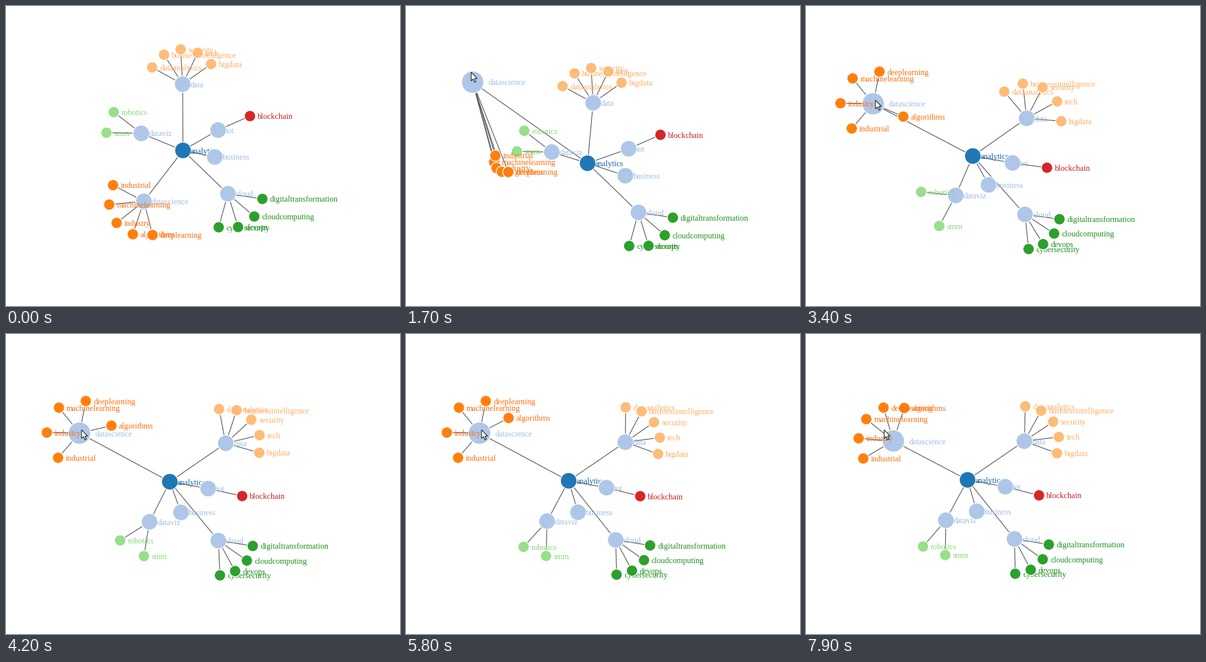
A matplotlib script that plays this animation: 600x457 px, repeating every 8 s.

```python
import numpy as np
import matplotlib.pyplot as plt
from matplotlib.animation import FuncAnimation
from matplotlib.collections import LineCollection
from matplotlib.colors import to_rgb
from matplotlib.patches import Circle, Polygon

W, H, DPI = 600, 457, 100
FRAMES, STEP = 80, 100
# The hub is grabbed and pulled away, the graph swings round and settles.
GRAB, PULLED, SWUNG, TURNED, RELEASE, END = 1250, 1700, 2400, 3400, 7300, 7900
SETTLE = 670
DRIFT, ROOT_DRIFT = np.array([16, 28.5]), np.array([7, 19.5])
RECOIL = np.array([-1.5, -1.3])
TRAIL, SQUEEZE = np.array([50, 120]), 0.65
LINK = 53
ROOT, HELD = "analytics", "datascience"

# Hub centres at rest, swung, turned and settled.
HUBS = {
    ROOT: [(269.5, 220), (267, 234.5), (254, 228.5), (247.5, 223.5)],
    "data": [(269, 119), (319, 178.5), (336, 171), (334, 164.5)],
    "dataviz": [(206, 194), (230.5, 281.5), (228, 288.5), (214.5, 285)],
    "iot": [(323, 189), (335, 247.5), (314.5, 239), (305, 234)],
    "business": [(318, 230), (299, 275.5), (278, 272.5), (261.5, 271.5)],
    "cloud": [(338, 286), (352, 336), (333.5, 317.5), (319, 313.5)],
}
# Time and place of the dragged hub.
DRAG = np.array([(GRAB, 210, 297.5), (PULLED, 101.5, 116), (2000, 95, 99),
                 (SWUNG, 97, 105), (2900, 102.5, 148.5), (3500, 103, 148.5),
                 (4000, 112, 151)])


def fan(order, centre, spread):
    """Leaf angles spread evenly around a centre, in degrees."""
    mid = (len(order) - 1) / 2
    return {n: centre + (i - mid) * spread for i, n in enumerate(order)}


def fans(names, *shapes):
    order = names.split()
    stages = [fan(order, *shape) for shape in shapes]
    return order, stages + stages[-1:]


def held_fans():
    at_rest = "deeplearning algorithms industry machinelearning industrial".split()
    swung = "deeplearning algorithms industrial industry machinelearning".split()
    ring = swung[2:][:] + swung[:2]
    opened = fan(ring, 231, 50)
    stages = [fan(at_rest, 141.6, 33), fan(swung, 90, 36),
              opened | {"algorithms": 23}, opened, fan(ring, 219, 34.6)]
    return swung[::-1], stages


FAMILIES = {
    "data": ("#ffbb78", *fans(
        "dataanalytics businessintelligence security tech bigdata",
        (266.7, 29), (273.7, 34.5), (297.4, 33.7), (326, 27.2))),
    "dataviz": ("#98df8a", *fans(
        "smm robotics", (199.4, 36.7), (198, 64.6), (152, 67.5), (111, 40))),
    HELD: ("#ff7f0e", *held_fans()),
    "iot": ("#d62728", *fans(
        "blockchain", (-23.7, 0), (-0.5, 0), (8, 0), (14.3, 0))),
    "cloud": ("#2ca02c", *fans(
        "cybersecurity devops cloudcomputing digitaltransformation",
        (57, -32.3), (50, -25.5), (46, -25.4), (49, -26.5))),
}


def ramp(t, a, b):
    return np.clip((t - a) / (b - a), 0, 1)


def smooth(u):
    return u * u * (3 - 2 * u)


def hermite(a, b, u, m0=0, m1=0):
    return a + (b - a) * smooth(u) + m0 * u * (1 - u)**2 - m1 * u * u * (1 - u)


def relax(keys, t, drift=0):
    """Drift off, swing, turn, settle exponentially, then give way on release."""
    rest, swung, turned, settled, freed = keys
    if t < PULLED:
        return rest + drift * ramp(t, GRAB, PULLED)**2
    if t < SWUNG:
        speed = 2 * drift / (PULLED - GRAB) * (SWUNG - PULLED)
        return hermite(rest + drift, swung, ramp(t, PULLED, SWUNG), speed)
    if t < TURNED:
        speed = (settled - turned) / SETTLE * (TURNED - SWUNG)
        return hermite(swung, turned, ramp(t, SWUNG, TURNED), 0, speed)
    near = settled + (turned - settled) * np.exp((TURNED - t) / SETTLE)
    return near + (freed - settled) * ramp(t, RELEASE, END)**2


def drag(t):
    """Smooth curve through the drag points."""
    times, spots = DRAG[:, 0], DRAG[:, 1:]
    speed = np.gradient(spots, times, axis=0)
    speed[[0, -1]] = 0
    i = np.clip(np.searchsorted(times, t, side="right") - 1, 0, len(times) - 2)
    span = times[i + 1] - times[i]
    return hermite(spots[i], spots[i + 1], ramp(t, times[i], times[i + 1]),
                   speed[i] * span, speed[i + 1] * span)


def cursor_at(t):
    free = ramp(t, RELEASE, END)**2
    spot = drag(t + 70) + (3 + 4 * free, -5)
    enter = smooth(ramp(t, 150, 850))
    return spot * enter + np.array([228, -20]) * (1 - enter)


def px(n):
    return n * 72 / DPI


fig = plt.figure(figsize=(W / DPI, H / DPI), dpi=DPI, facecolor="white")
ax = fig.add_axes([0, 0, 1, 1])
ax.set_xlim(0, W)
ax.set_ylim(H, 0)
ax.axis("off")

circles, labels, parent, hub_keys, angles = {}, {}, {}, {}, {}


def add_node(name, color, r):
    z = 2 + len(circles)
    ink = np.array(to_rgb(color))**1.25
    circles[name] = ax.add_patch(Circle((0, 0), r, fc=color, ec="white",
                                        lw=px(1.2), zorder=z))
    labels[name] = ax.text(0, 0, name, color=ink, family="Liberation Serif",
                           size=px(12.2), va="baseline", zorder=z)


for name, spots in HUBS.items():
    spots = np.array(spots, float)
    hub_keys[name] = [*spots, spots[-1] + RECOIL]
for name in (ROOT, "data", "dataviz", HELD, "iot", "business", "cloud"):
    add_node(name, "#1f77b4" if name == ROOT else "#aec7e8", 12.5)
    if name != ROOT:
        parent[name] = ROOT
for hub, (color, names, stages) in FAMILIES.items():
    for name in names:
        add_node(name, color, 8.5)
        parent[name] = hub
        angles[name] = np.unwrap(np.radians([s[name] for s in stages]))

links = ax.add_collection(LineCollection([], colors="#555555", lw=px(1.1), zorder=1))
ARROW = np.array([(0, 0), (0, 13), (3, 10.4), (5.2, 15.2), (7.3, 14.2),
                  (5.2, 9.6), (9.2, 9.4)])
arrow = ax.add_patch(Polygon(ARROW, fc="white", ec="#111111", lw=px(1), zorder=99))


def layout(t):
    pos = {n: relax(keys, t, ROOT_DRIFT if n == ROOT else DRIFT)
           for n, keys in hub_keys.items()}
    pos[HELD] = drag(t) + np.array([21, 12]) * ramp(t, RELEASE, END)**2

    # Leaves of the dragged hub lag behind it in a tight bunch.
    lag = smooth(ramp(t, GRAB, PULLED)) - smooth(ramp(t, PULLED, 2200))
    grip = smooth(ramp(t, GRAB, PULLED)) - smooth(ramp(t, RELEASE, END))
    for name, keys in angles.items():
        a = relax(keys, t)
        offset = LINK * np.array([np.cos(a), np.sin(a)])
        if parent[name] == HELD:
            offset = offset * (1 - 0.06 * grip) * (1 - SQUEEZE * lag) + TRAIL * lag
        pos[name] = pos[parent[name]] + offset
    return pos


def draw(frame):
    t = frame * STEP
    pos = layout(t)
    hover = smooth(ramp(t, 800, 1550))
    circles[HELD].set_radius(12.5 + 4.4 * hover)
    for name, (x, y) in pos.items():
        circles[name].center = x, y
        shift = 12 * hover if name == HELD else 0
        labels[name].set_position((x + 11.5 + shift, y + 4.5))
    links.set_segments([(pos[a], pos[b]) for b, a in parent.items()])
    arrow.set_xy(ARROW + cursor_at(t))
    return [links, arrow, *circles.values(), *labels.values()]


anim = FuncAnimation(fig, draw, frames=FRAMES, interval=STEP, repeat=True,
                     repeat_delay=0, blit=False)
plt.show()
```
